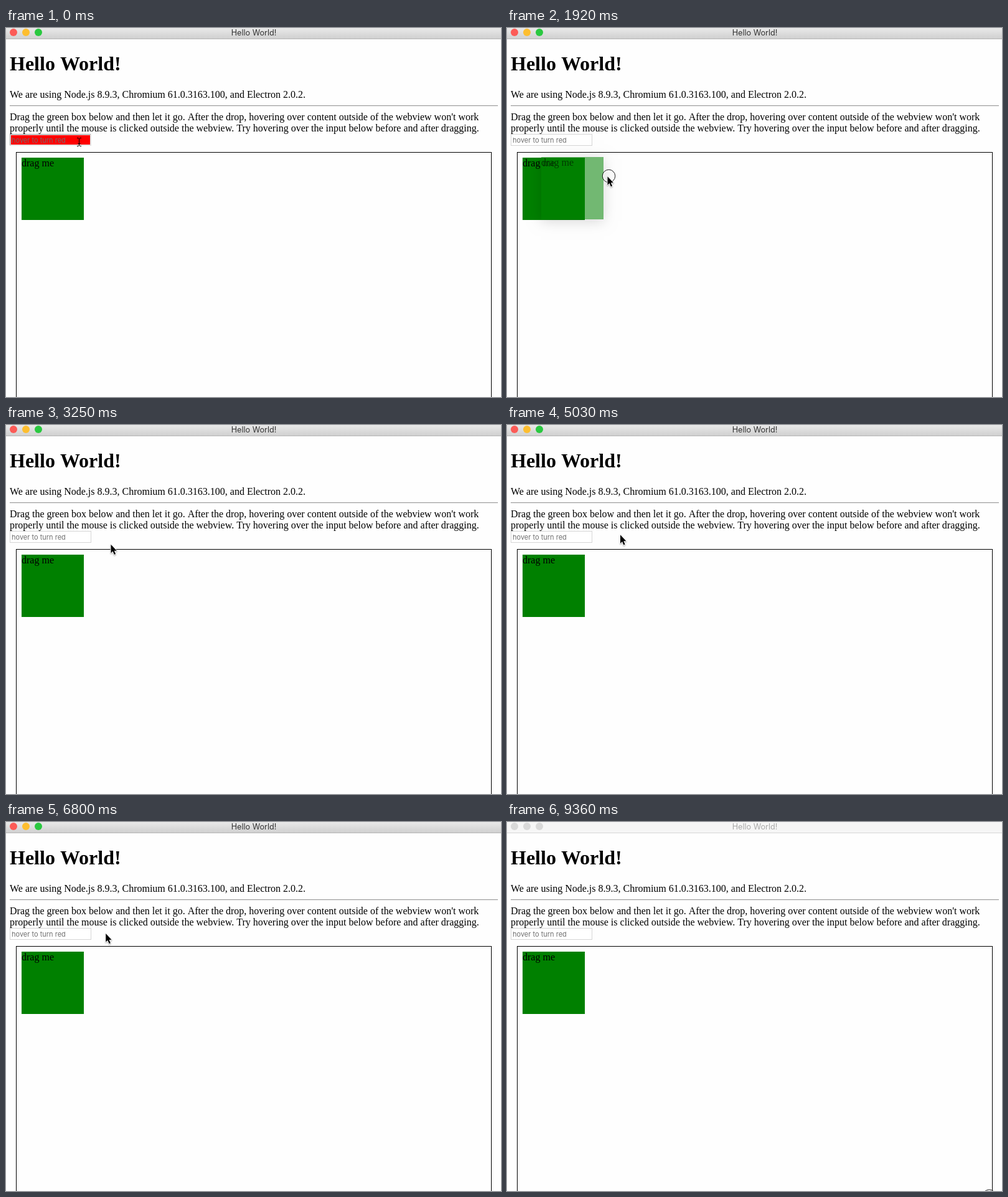
Animation, 795 px wide and 592 px high, one loop 9.46 s. Source, as an HTML page with a canvas:

```html
<!DOCTYPE html>
<html lang="en">
<head>
<meta charset="utf-8">
<title>Hello World!</title>
<style>
html, body { margin: 0; width: 100%; height: 100%; overflow: hidden; background: #fefefe; }
canvas { display: block; }
</style>
</head>
<body>
<canvas id="stage" width="795" height="592"></canvas>
<script>
const ctx = document.getElementById('stage').getContext('2d');
const LOOP = 9460, STEP = 148, BLUR_AT = 9360;
const PRESS = 12, RELEASE = 17, CLICK = 37;
const SERIF = '"Liberation Serif", "Times New Roman", serif';
const SANS = 'Inter, Roboto, sans-serif';
const BODY = '16px ' + SERIF;
const GREEN = '#008000';

const point = (x, y) => ({ x, y });
const home = point(25, 208);
const grip = point(76, 31.5);
const field = point(115, 180);
const aside = point(162, 178);
const above = point(192, 152);

// Each trip runs between two steps; the pointer rests in the gaps.
const trips = [
  [0, 3, point(160, 172)], [4, 7, field], [7, 10, point(164, 156)],
  [10, 12, point(home.x + grip.x, home.y + grip.y)],
  [12, 13, point(161, 237.5)], [13, 16, point(337, 358.5)],
  [19, 22, point(168, 191)], [22, 24, field], [25, 27, aside], [28, 31, field],
  [31, 34, point(181.5, 175.5)], [34, 36, above],
  [39, 42, field], [42, 47, point(165, 178)],
  [48, 50, field], [51, 54, point(184, 186)], [56, 61, point(772, 600)]
];

const clamp = v => Math.max(0, Math.min(1, v));
const smooth = p => p * p * (3 - 2 * p);
const mix = (a, b, p) => point(a.x + (b.x - a.x) * p, a.y + (b.y - a.y) * p);

function pointerAt(n) {
  return trips.reduce((pos, [from, to, goal]) =>
    mix(pos, goal, smooth(clamp((n - from) / (to - from)))), point(117, 182));
}

function rect(color, x, y, w, h) {
  ctx.fillStyle = color;
  ctx.fillRect(x, y, w, h);
}

function frame(color, x, y, w, h) {
  ctx.strokeStyle = color;
  ctx.lineWidth = 1;
  ctx.strokeRect(x + .5, y + .5, w - 1, h - 1);
}

function text(str, x, y, font, color = '#000', align = 'left') {
  ctx.font = font;
  ctx.fillStyle = color;
  ctx.textAlign = align;
  ctx.fillText(str, x, y);
}

function circle(x, y, r) {
  ctx.beginPath();
  ctx.arc(x, y, r, 0, Math.PI * 2);
}

function titleBar(active) {
  const shade = ctx.createLinearGradient(0, 0, 0, 17);
  shade.addColorStop(0, active ? '#e9e9e9' : '#f6f6f6');
  shade.addColorStop(1, active ? '#d0d0d0' : '#f6f6f6');
  rect(shade, 0, 0, 795, 17);
  rect(active ? '#b5b5b5' : '#d6d6d6', 0, 17, 795, 1);
  ['#fc5b57', '#fdbe2f', '#2ac840'].forEach((color, i) => {
    circle(12 + i * 20, 7, 6);
    ctx.fillStyle = active ? color : '#d9d9d9';
    ctx.fill();
  });
  text('Hello World!', 398, 12, '12.6px ' + SANS, active ? '#333' : '#a8a8a8', 'center');
}

function page() {
  text('Hello World!', 6, 68, 'bold 32px ' + SERIF);
  text('We are using Node.js 8.9.3, Chromium 61.0.3163.100, and Electron 2.0.2.', 6, 112, BODY);
  rect('#9a9a9a', 6, 124, 784, 1);
  rect('#eee', 6, 125, 784, 1);
  text("Drag the green box below and then let it go. After the drop, hovering over content outside of the webview won't work", 6, 148, BODY);
  text('properly until the mouse is clicked outside the webview. Try hovering over the input below before and after dragging.', 6, 166, BODY);
  frame('#000', 16, 199, 764, 500);
}

function input(hot) {
  if (hot) {
    rect('#e4e4e4', 6, 170, 131, 19);
    rect('#a0a0a0', 6, 170, 130, 1);
    rect('#a0a0a0', 6, 170, 1, 18);
    rect('#f00', 8, 172, 127, 15);
  } else {
    rect('#fff', 6, 170, 131, 19);
    frame('#d6d6d6', 6, 170, 131, 19);
  }
  text('hover to turn red', 9, 184, '11px ' + SANS, '#707070');
}

function box({ x, y }) {
  rect(GREEN, x, y, 100, 100);
  text('drag me', x, y + 14, BODY);
}

function shadow({ x, y }) {
  ctx.save();
  ctx.beginPath();
  ctx.rect(0, 0, 795, 592);
  ctx.rect(x, y, 100, 100);
  ctx.clip('evenodd');
  ctx.shadowColor = 'rgba(0,0,0,.28)';
  ctx.shadowBlur = 20;
  ctx.shadowOffsetY = 3;
  rect(GREEN, x, y, 100, 100);
  ctx.restore();
}

// The copy leaves the box and catches up with the pointer while fading in.
function dragCopy(n, tip) {
  const pickup = clamp((n - PRESS) / 2);
  const pos = mix(home, point(tip.x - grip.x, tip.y - grip.y), pickup);
  ctx.save();
  ctx.globalAlpha = n < RELEASE ? .28 + .54 * pickup : .4;
  shadow(pos);
  box(pos);
  ctx.restore();
}

function ring({ x, y }) {
  ctx.lineWidth = 1.5;
  ctx.strokeStyle = '#fff';
  circle(x + 2.5, y, 9.2);
  ctx.stroke();
  ctx.lineWidth = .9;
  ctx.strokeStyle = '#000';
  circle(x + 2.5, y, 10.2);
  ctx.stroke();
}

function arrow({ x, y }) {
  const shape = new Path2D('M0 0V13.6L3 10.8L5.4 16.3L7.6 15.3L5.3 10H9.4Z');
  ctx.save();
  ctx.translate(x + .5, y + .8);
  ctx.lineJoin = 'round';
  ctx.shadowColor = 'rgba(0,0,0,.35)';
  ctx.shadowBlur = 2;
  ctx.shadowOffsetY = 1;
  ctx.strokeStyle = '#fff';
  ctx.lineWidth = 1.8;
  ctx.stroke(shape);
  ctx.shadowColor = 'transparent';
  ctx.fillStyle = '#000';
  ctx.fill(shape);
  ctx.restore();
}

function beam({ x, y }) {
  ctx.save();
  ctx.translate(Math.round(x) + .5, Math.round(y) + .5);
  ctx.strokeStyle = '#000';
  ctx.lineWidth = 1;
  ctx.stroke(new Path2D('M-3.5 -6H-1.5L0 -4.7L1.5 -6H3.5M0 -4.7V5.7M-3.5 7H-1.5L0 5.7L1.5 7H3.5M-2 3H2'));
  ctx.restore();
}

function draw(t) {
  const n = Math.floor((t + 9) / STEP);
  const active = t < BLUR_AT;
  const tip = pointerAt(n);
  const dragging = n > PRESS && n <= RELEASE;
  const stuck = n > PRESS && n <= CLICK;
  const inField = tip.x >= 6 && tip.x < 137 && tip.y >= 170 && tip.y < 189;
  const hot = inField && !stuck;
  const pressed = (n >= PRESS && n < RELEASE) || n === CLICK || !active;

  rect('#fefefe', 0, 0, 795, 592);
  titleBar(active);
  page();
  input(hot);
  box(home);
  if (dragging) dragCopy(n, tip);
  if (pressed) ring(tip);
  (hot ? beam : arrow)(tip);
}

const start = performance.now();
function tick() {
  draw((performance.now() - start) % LOOP);
  requestAnimationFrame(tick);
}
tick();
</script>
</body>
</html>
```
